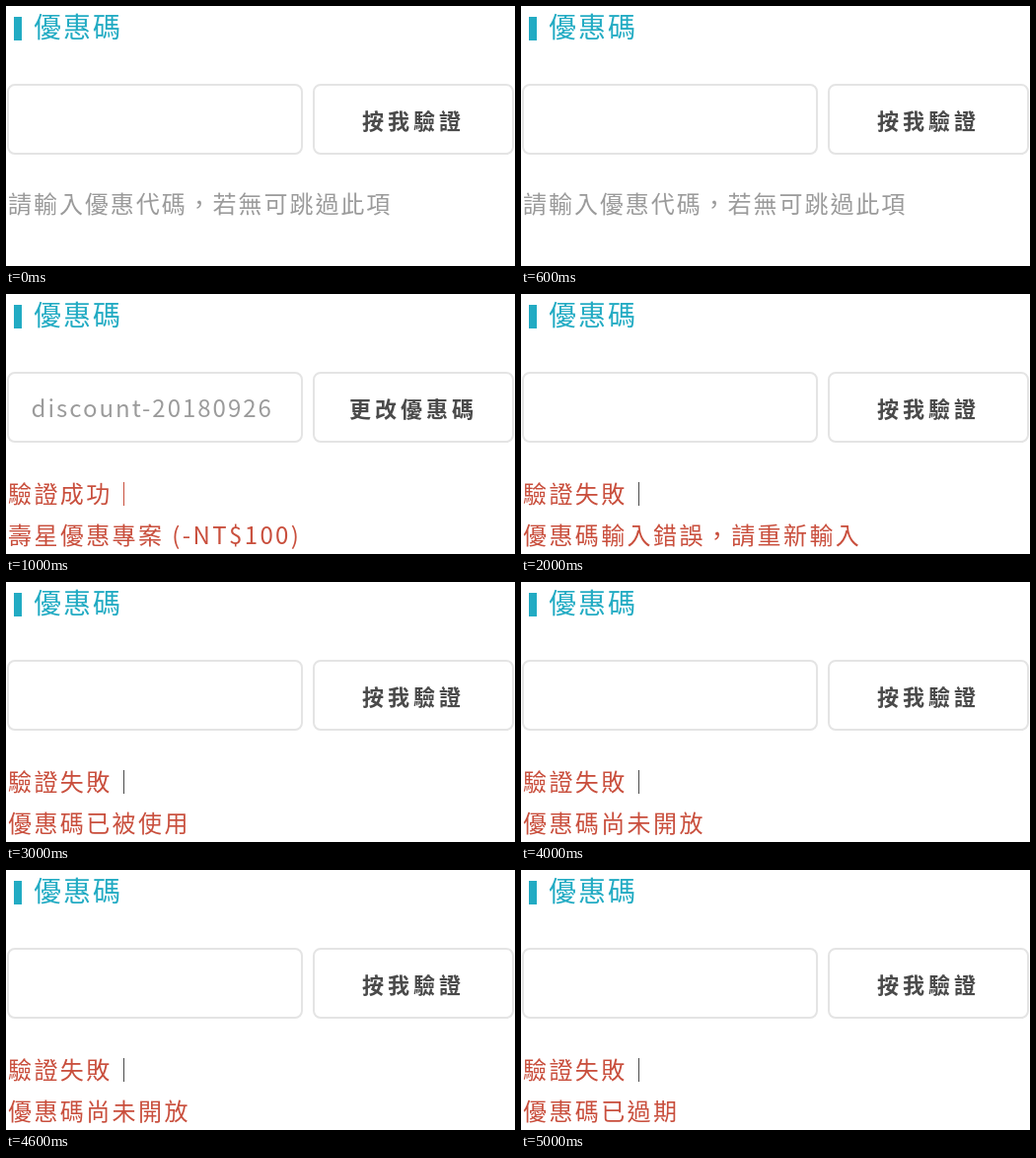
An HTML page for the animation above (6 s loop, 516 by 264 pixels).

```html
<!DOCTYPE html>
<html lang="zh-Hant-TW">
<head>
<meta charset="utf-8">
<title>優惠碼</title>
<style>
html, body { margin: 0; width: 100%; height: 100%; overflow: hidden; background: #fff; }
svg { display: block; font: 24px "Noto Sans CJK TC", "Noto Sans CJK", sans-serif; }
text { white-space: pre; }
.title { font-size: 28px; font-weight: 500; letter-spacing: 2px; fill: #22abc3; }
.box { fill: #fff; stroke: #e4e4e4; stroke-width: 2; }
.code { font-weight: 500; letter-spacing: 2px; fill: #9b9b9b; }
.button { font-size: 22px; font-weight: 700; letter-spacing: 4px; fill: #4a4a4a; }
.hint { letter-spacing: 1.95px; fill: #9b9b9b; }
.result { letter-spacing: 2.4px; fill: #c94f3d; }
</style>
</head>
<body>
<svg width="516" height="264" viewBox="0 0 516 264">
  <rect x="8" y="11" width="8" height="24" fill="#22abc3"/>
  <text class="title" x="28" y="32">優惠碼</text>
  <rect class="box" x="2" y="80" width="298" height="70" rx="7"/>
  <rect class="box" x="312" y="80" width="202" height="70" rx="7"/>
  <text class="code" id="code" x="25.5" y="125"></text>
  <text class="button" id="button" y="125"></text>
  <text class="hint" id="hint" x="2" y="210">請輸入優惠代碼，若無可跳過此項</text>
  <g id="result">
    <text class="result" id="status" x="2" y="212"></text>
    <rect id="divider" x="119" y="191" width="1" height="24"/>
    <text class="result" id="detail" x="2" y="254"></text>
  </g>
</svg>
<script>
const STEP = 1000;
const failed = detail => ({ status: '驗證失敗', detail });
const states = [
  {},
  { status: '驗證成功', detail: '壽星優惠專案 (-NT$100)', code: 'discount-20180926' },
  failed('優惠碼輸入錯誤，請重新輸入'),
  failed('優惠碼已被使用'),
  failed('優惠碼尚未開放'),
  failed('優惠碼已過期')
];
const el = id => document.getElementById(id);
let shown;

function show({ status = '', detail = '', code = '' }) {
  el('status').textContent = status;
  el('detail').textContent = detail;
  el('code').textContent = code;
  el('button').textContent = code ? '更改優惠碼' : '按我驗證';
  el('button').setAttribute('x', code ? 348 : 361);
  el('divider').setAttribute('fill', code ? '#c94f3d' : '#4a4a4a');
  el('hint').style.display = status ? 'none' : '';
  el('result').style.display = status ? '' : 'none';
}

const start = performance.now();
function tick() {
  const elapsed = Math.max(0, performance.now() - start);
  const state = states[Math.floor(elapsed / STEP) % states.length];
  if (state !== shown) show(shown = state);
  requestAnimationFrame(tick);
}
tick();
</script>
</body>
</html>
```
